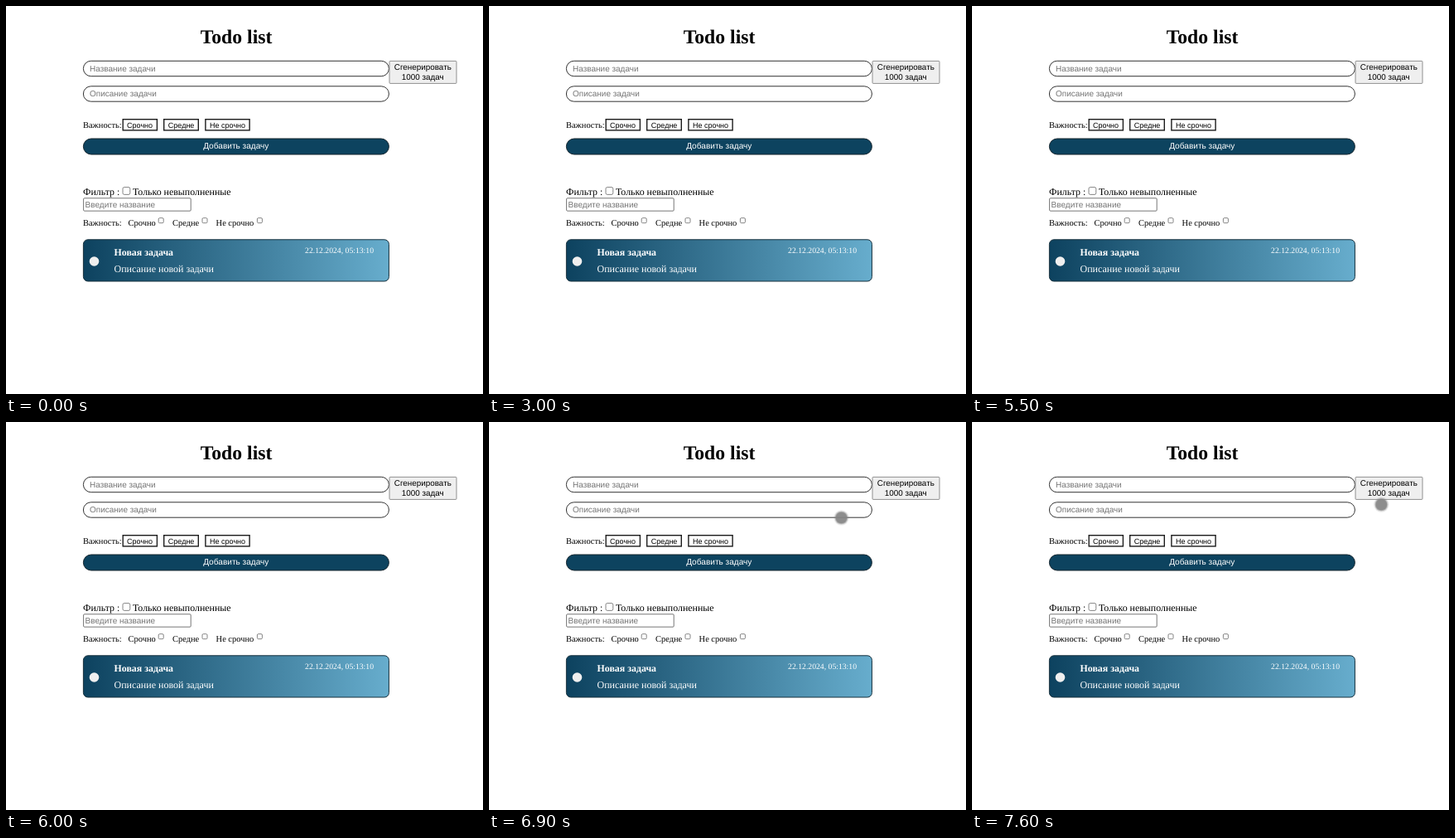
An HTML page that plays this animation: 576x468 px, repeating every 8 s.

```html
<!DOCTYPE html>
<html lang="ru">
<head>
<meta charset="utf-8">
<title>Todo list</title>
<style>
  html, body { margin: 0; width: 100%; height: 100%; overflow: hidden; background: #fff; }
  svg { display: block; width: 576px; height: 468px; }
  text { font-family: "Liberation Serif", "Times New Roman", serif; font-size: 11.9px; text-rendering: geometricPrecision; }
  .ui { font-family: "Liberation Sans", Arial, sans-serif; font-size: 9.9px; }
  .hint { fill: #757575; font-size: 10px; }
  .small { font-size: 10.45px; }
  .tag { font-size: 9px; }
  .mid { text-anchor: middle; }
  .light { fill: #fff; }
  .field { fill: #fff; stroke: #333; }
  .tagbox { fill: #fff; stroke: #1c1c1c; stroke-width: 1.4; }
  .check { fill: #fff; stroke: #767676; stroke-width: .9; }

  /* The pointer is sampled ten times a second, so it jumps between positions. */
  #pointer { animation: pointer 8s step-end infinite; }
  @keyframes pointer {
    0%      { transform: translate(425.5px, 115.5px); opacity: 0; }
    86.25%  { transform: translate(425.5px, 115.5px); opacity: 1; }
    87.5%   { transform: translate(345px, 143px); opacity: 1; }
    88.75%  { transform: translate(307px, 158px); opacity: 1; }
    93.75%  { transform: translate(425px, 105px); opacity: 1; }
    95%, 100% { transform: translate(494.3px, 99.6px); opacity: 1; }
  }
</style>
</head>
<body>
<svg viewBox="0 0 576 468">
  <defs>
    <linearGradient id="card">
      <stop offset="0" stop-color="#0d425f"/>
      <stop offset="1" stop-color="#67adcd"/>
    </linearGradient>
  </defs>

  <text class="mid" x="278" y="44.6" style="font-size:23.7px;font-weight:bold">Todo list</text>

  <rect class="field" x="93.4" y="66.3" width="369" height="18.4" rx="9.2"/>
  <text class="ui hint" x="101" y="78.8">Название задачи</text>
  <rect class="field" x="93.4" y="96.8" width="369" height="18.4" rx="9.2"/>
  <text class="ui hint" x="101" y="109.3">Описание задачи</text>

  <rect x="463" y="66.4" width="81" height="27" rx="1" fill="#efefef" stroke="#858585" stroke-width=".9"/>
  <text class="ui mid" x="503.3" y="77">Сгенерировать</text>
  <text class="ui mid" x="503.3" y="89.4">1000 задач</text>

  <text class="small" x="93" y="146.5">Важность:</text>
  <rect class="tagbox" x="141.2" y="136.7" width="41.2" height="13.2"/>
  <text class="ui tag mid" x="161.6" y="146.6">Срочно</text>
  <rect class="tagbox" x="190.7" y="136.7" width="41.6" height="13.2"/>
  <text class="ui tag mid" x="211.6" y="146.6">Средне</text>
  <rect class="tagbox" x="240.9" y="136.7" width="53.2" height="13.2"/>
  <text class="ui tag mid" x="267.6" y="146.6">Не срочно</text>

  <rect x="93.4" y="160" width="369" height="19" rx="9.5" fill="#0d435f" stroke="#14242d"/>
  <text class="ui mid light" x="277.8" y="172.4" style="font-size:10.1px">Добавить задачу</text>

  <text x="93" y="227.8">Фильтр :</text>
  <rect class="check" x="141" y="218.6" width="8.8" height="8.8" rx="1.8"/>
  <text x="153" y="227.8">Только невыполненные</text>
  <rect x="93.6" y="231.8" width="129.6" height="15.4" rx="1.2" fill="#fff" stroke="#777"/>
  <text class="ui hint" x="95.6" y="242.9">Введите название</text>

  <text class="small" x="93" y="264.8">Важность:</text>
  <text class="small" x="147.5" y="264.8">Срочно</text>
  <rect class="check" x="184.2" y="255.7" width="6" height="6" rx="1.3"/>
  <text class="small" x="201" y="264.8">Средне</text>
  <rect class="check" x="237" y="255.7" width="6" height="6" rx="1.3"/>
  <text class="small" x="253.6" y="264.8">Не срочно</text>
  <rect class="check" x="303.4" y="255.7" width="6" height="6" rx="1.3"/>

  <rect x="93.4" y="281.8" width="369" height="50.2" rx="5.5" fill="url(#card)" stroke="#17303c"/>
  <circle cx="106.5" cy="308" r="5.8" fill="#efefef"/>
  <text class="light" x="130.5" y="300.5" font-weight="bold">Новая задача</text>
  <text class="light" x="130.5" y="321.2" style="font-size:12px">Описание новой задачи</text>
  <text class="light" x="444" y="298" text-anchor="end" style="font-size:9.7px">22.12.2024, 05:13:10</text>

  <g id="pointer">
    <circle r="8.8" fill="#808080" fill-opacity=".3"/>
    <circle r="7.3" fill="#858585" fill-opacity=".9"/>
  </g>
</svg>
</body>
</html>
```
